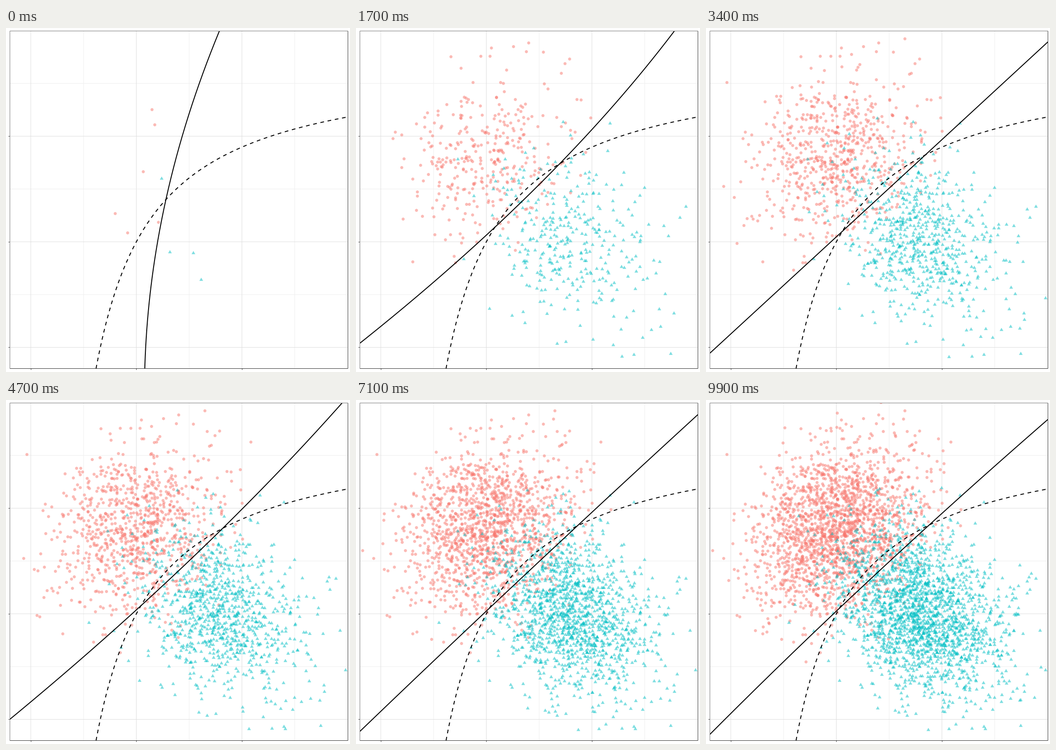
Recreate the animation shown at these times as a matplotlib script. Size 748x748 px, loop 10000 ms.

```python
import numpy as np
import matplotlib.pyplot as plt
from matplotlib.animation import FuncAnimation

SIZE, DPI = 748, 100
PX = 72 / DPI                       # points per pixel
FRAMES, INTERVAL = 100, 100
LEFT, TOP, RIGHT, BOTTOM = 8, 5.7, 742.5, 740.4
LOW, HIGH = -3, 5                   # range of both axes
RHO = 0.3
PER_STEP = 20                       # new samples per class and step
RED, TEAL = "#F8766D", "#00BFC4"
GREY, DARK = "#777777", "#333333"

# Samples the fit starts from
RED_START = [(0.37, 3.13), (0.43, 2.77), (0.16, 1.67),
             (-0.51, 0.67), (-0.21, 0.22), (0.52, 0.47)]
TEAL_START = [(0.59, 1.5), (0.79, -0.24), (1.35, -0.26), (1.53, -0.89)]

# Fitted boundary as it settles: step, x at the bottom edge, x at the top edge
FIT_KEYS = np.array([(0, 0.2, 1.97), (17, -3.76, 4.46), (34, -3.39, 5.3),
                     (47, -3.61, 4.88), (71, -3.22, 5.32), (87, -3.06, 5.27),
                     (99, -3.14, 5.47)])


def samples(rng, start, mean, rho):
    """Correlated normal samples in the order they appear."""
    total = PER_STEP * (FRAMES - 1)
    cov = [[1, rho], [rho, 1]]
    return np.vstack([start, rng.multivariate_normal(mean, cov, total)])


def log_count(step):
    return np.log(10 + 2 * PER_STEP * step)


def fit_curve(step):
    """Parabola x(y) through the two edges and a point near (1, 1)."""
    steps, lows, highs = FIT_KEYS.T
    low, high = (np.interp(log_count(step), log_count(steps), ends)
                 for ends in (lows, highs))
    mid = 1 - 0.3 * np.exp(-step / 17)
    t = (heights - 1) / 4
    return mid + (high - low) / 2 * t + ((high + low) / 2 - mid) * t ** 2


fig = plt.figure(figsize=(SIZE / DPI, SIZE / DPI), dpi=DPI, facecolor="white")
ax = fig.add_axes([LEFT / SIZE, 1 - BOTTOM / SIZE,
                   (RIGHT - LEFT) / SIZE, (BOTTOM - TOP) / SIZE])
ax.set(xlim=(LOW, HIGH), ylim=(LOW, HIGH))
ax.axis("off")


def rule(xs, ys, color, z=0, snap=None):
    ax.plot(xs, ys, color=color, lw=PX, zorder=z, clip_on=False,
            solid_capstyle="butt", snap=snap)


edges, tick = [LOW, HIGH], [LOW - 0.03, LOW]
for v in np.arange(-2.5, 5, 1.25):
    major = v % 2.5 == 0
    color = "#DEDEDE" if major else "#EFEFEF"
    rule([v, v], edges, color, major, False)
    rule(edges, [v, v], color, major, False)
    if major:
        rule([v, v], tick, DARK)
        rule(tick, [v, v], DARK)

for side, color in ((LOW, GREY), (HIGH, DARK)):
    rule([side, side], edges, color, 9)
for side, color in ((HIGH, GREY), (LOW, DARK)):
    rule(edges, [side, side], color, 9)

rng = np.random.default_rng(12)
triangle = [(0, 1.555), (1.347, -0.778), (-1.347, -0.778), (0, 1.555)]
classes = []
for start, mean, rho, color, marker, size in (
        (RED_START, (0, 2), RHO, RED, "o", 6.6),
        (TEAL_START, (2, 0), -RHO, TEAL, triangle, 9.3)):
    dots, = ax.plot([], [], ls="none", marker=marker, ms=size * PX, mew=0,
                    color=color, alpha=0.5, zorder=3)
    classes.append((dots, samples(rng, start, mean, rho), len(start)))

# Ideal boundary between two normals with opposite correlation
first = LOW * (1 - RHO) / (1 + RHO - LOW * RHO)
u = np.linspace(first, HIGH, 500)
ax.plot(u, u * (1 + RHO) / (1 - RHO + RHO * u), color="black", lw=2 * PX,
        ls=(0, (4, 4)), dash_capstyle="butt", zorder=5)

heights = np.linspace(LOW - 0.1, HIGH + 0.1, 200)
fit, = ax.plot([], [], color="black", lw=2 * PX, zorder=4)


def update(step):
    for dots, pts, begin in classes:
        dots.set_data(*pts[:begin + PER_STEP * step].T)
    fit.set_data(fit_curve(step), heights)
    return [*(dots for dots, _, _ in classes), fit]


anim = FuncAnimation(fig, update, frames=FRAMES, interval=INTERVAL,
                     repeat=True, repeat_delay=0)
plt.show()
```
